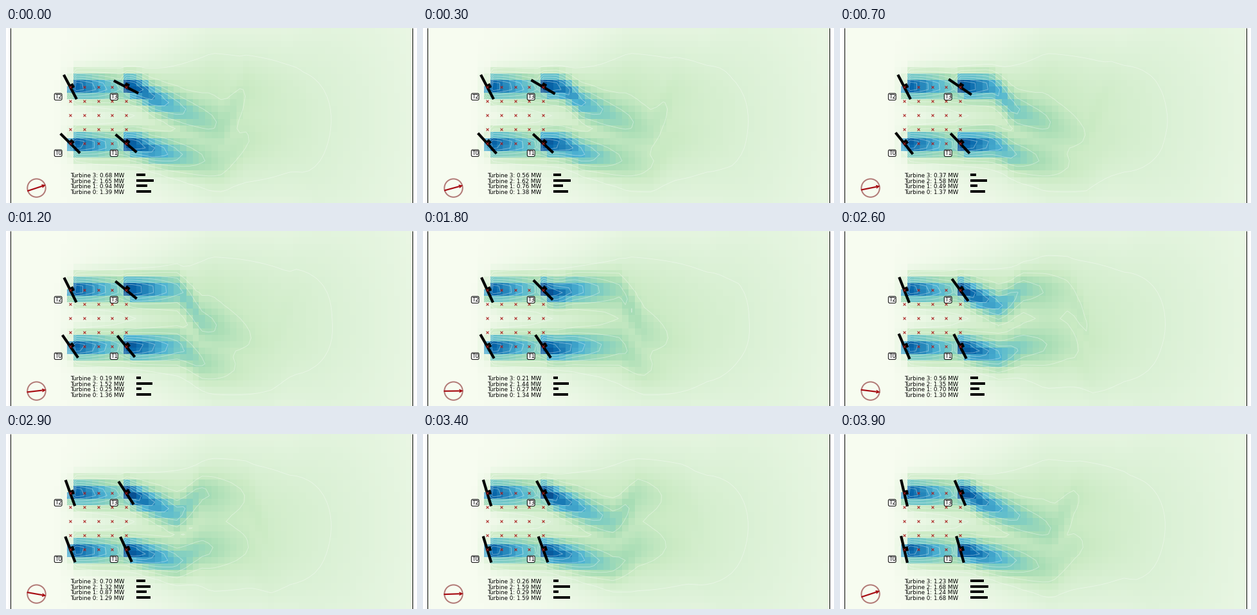
A matplotlib script that plays this animation: 640 px wide and 273 px high, repeating every 4000 ms.

```python
import numpy as np
import matplotlib.pyplot as plt
from matplotlib.animation import FuncAnimation
from matplotlib.patches import Circle, FancyBboxPatch, Polygon

W, H, DPI = 640, 273, 100
PT = 72 / DPI                     # points per pixel
LEFT, RIGHT = 7, 633
COLS, ROWS = 64, 27
FRAMES, INTERVAL = 40, 100
RATED = 1.69                      # MW, rotor facing free wind
WAKE_SPEED = 6.5                  # pixels per frame
RED = "#a80d14"


class Turbine:
    def __init__(self, x, y, start, end, ease, steer):
        self.hub = np.array([x, y])
        self.start, self.end, self.ease = start, end, ease
        self.steer = steer
        self.waked = x > 150

    def tilt(self, t):
        u = (t / (FRAMES - 1)) ** self.ease
        return self.start + (self.end - self.start) * u

    def power(self, t):
        yaw = np.radians(self.tilt(t) - wind(t))
        out = RATED * np.cos(yaw) ** 1.75
        if self.waked:
            out *= 1 - 0.83 * np.exp(-0.5 * ((wind(t) - 4) / 9.5) ** 2)
        return out


TURBINES = [
    Turbine(100, 180, 45, 13.2, 0.95, 0.03),
    Turbine(187, 180, 49.7, 15.8, 1, 0.22),
    Turbine(100, 92, 27.8, 13.4, 2, 0.03),
    Turbine(187, 92, 62.9, 23, 1, 0.42),
]

cell_w, cell_h = (RIGHT - LEFT) / COLS, H / ROWS
xs = LEFT + cell_w * (np.arange(COLS) + 0.5)
ys = cell_h * (np.arange(ROWS) + 0.5)
X, Y = np.meshgrid(xs, ys)


def bell(d, width):
    return np.exp(-0.5 * (d / width) ** 2)


def wind(t):
    """Wind angle in degrees: a slow turn down, a quick turn back."""
    return np.interp(t, [0, 30, 39], [18.3, -11, 18.3])


def steering(t):
    """Sideways push on the air that passes a rotor at time t, 0 to 1."""
    return np.clip(0.75 - 1.2 * np.cos(2 * np.pi * (t - 5.5) / FRAMES), 0, 1)


FAR = (np.interp(X, [75, 320, 633], [0, 0.27, 0.085])
       * bell(Y - 143, np.interp(X, [150, 440, 633], [72, 118, 260])))


def wake(turbine, t):
    hx, hy = turbine.hub
    s = X - hx
    down = np.maximum(s, 0)
    drift = turbine.steer * steering(t - down / WAKE_SPEED)
    center = hy + np.sign(hy - H / 2) + drift * down
    out = 0.97 * np.exp(-(down / 92) ** 1.4) * bell(Y - center, 13.3 + 0.055 * down)

    if turbine.waked:
        shade = np.where(Y < hy + 8, 1, 0.6)
    else:
        shade = np.where((Y > hy - 5) & (Y < hy + 16), 0.75, 0.2)
    out = np.where(np.abs(s) < cell_w / 2, out * shade, out)
    induction = np.where(s > -1.6 * cell_w, 0.04 * bell(Y - hy, 20), 0)
    return np.where(s > -cell_w / 2, out, induction)


def field(t):
    near = sum(wake(turbine, t) ** 3 for turbine in TURBINES) ** (1 / 3)
    return FAR + (1 - FAR) * np.minimum(near, 1)


fig = plt.figure(figsize=(W / DPI, H / DPI), dpi=DPI, facecolor="white")
ax = fig.add_axes([0, 0, 1, 1])
ax.axis("off")
image = ax.imshow(field(0), cmap="GnBu", vmin=0, vmax=1, aspect="auto",
                  interpolation="nearest", extent=(LEFT, RIGHT, H, 0), zorder=0)
ax.set_xlim(0, W)
ax.set_ylim(H, 0)
ax.set_autoscale_on(False)


def stroke(width, color="black", z=4):
    return ax.plot([], [], color=color, lw=width * PT, zorder=z,
                   solid_capstyle="butt")[0]


def line_to(line, a, b):
    line.set_data([a[0], b[0]], [a[1], b[1]])


def heading(degrees):
    """Unit vectors along and across a direction."""
    a = np.radians(degrees)
    return np.array([np.cos(a), -np.sin(a)]), np.array([np.sin(a), np.cos(a)])


for edge in (LEFT, RIGHT):
    line_to(stroke(1, z=3), (edge, 0), (edge, H))

px, py = np.meshgrid(np.linspace(100, 187, 5), np.linspace(92, 180, 5))
ax.plot(px.ravel(), py.ravel(), "x", color="#aa1c1c", ms=4 * PT, mew=PT, zorder=6)

for i, turbine in enumerate(TURBINES):
    cx, cy = turbine.hub + (-18.8, 15.2)
    ax.add_patch(FancyBboxPatch((cx - 5.9, cy - 5.2), 11.8, 10.4,
                                boxstyle="round,pad=0,rounding_size=2",
                                fc="white", ec="black", lw=PT, zorder=7))
    ax.text(cx, cy + 3.3, f"T{i}", fontsize=8.8 * PT, ha="center",
            va="baseline", zorder=8)

rotors = [stroke(4.2) for _ in TURBINES]
nacelles = [stroke(7) for _ in TURBINES]
bars = [stroke(4) for _ in TURBINES]
labels = [ax.text(100, 259.1 - 8.7 * i, "", fontsize=8.8 * PT,
                  va="baseline", zorder=5) for i in range(4)]

DIAL = np.array([47.5, 249.6])
ax.add_patch(Circle(DIAL, 14.2, fc="none", ec="#b27a77", lw=2 * PT, zorder=4))
shaft = stroke(2.2, RED, 5)
head = ax.add_patch(Polygon([DIAL] * 3, fc=RED, ec="none", zorder=5))
contours = []


def draw(t):
    values = field(t)
    image.set_data(values)
    while contours:
        contours.pop().remove()
    contours.append(ax.contour(xs, ys, values, levels=np.arange(0.16, 0.9, 0.11),
                               colors="white", linewidths=0.9 * PT,
                               alpha=0.4, zorder=1))

    for i, turbine in enumerate(TURBINES):
        hub = turbine.hub
        along, across = heading(turbine.tilt(t))
        line_to(rotors[i], hub - 21.5 * across, hub + 21.5 * across)
        line_to(nacelles[i], hub, hub + 6.3 * along)

        power = turbine.power(t)
        labels[i].set_text(f"Turbine {i}: {power:.2f} MW")
        y = 255 - 8.7 * i
        line_to(bars[i], (203, y), (207 + 14 * power, y))

    along, across = heading(wind(t))
    base = DIAL + 9 * along
    line_to(shaft, DIAL - 15 * along, base)
    head.set_xy([DIAL + 15.3 * along, base + 3 * across, base - 3 * across])


anim = FuncAnimation(fig, draw, frames=FRAMES, interval=INTERVAL,
                     repeat=True, repeat_delay=0, blit=False)
plt.show()
```
